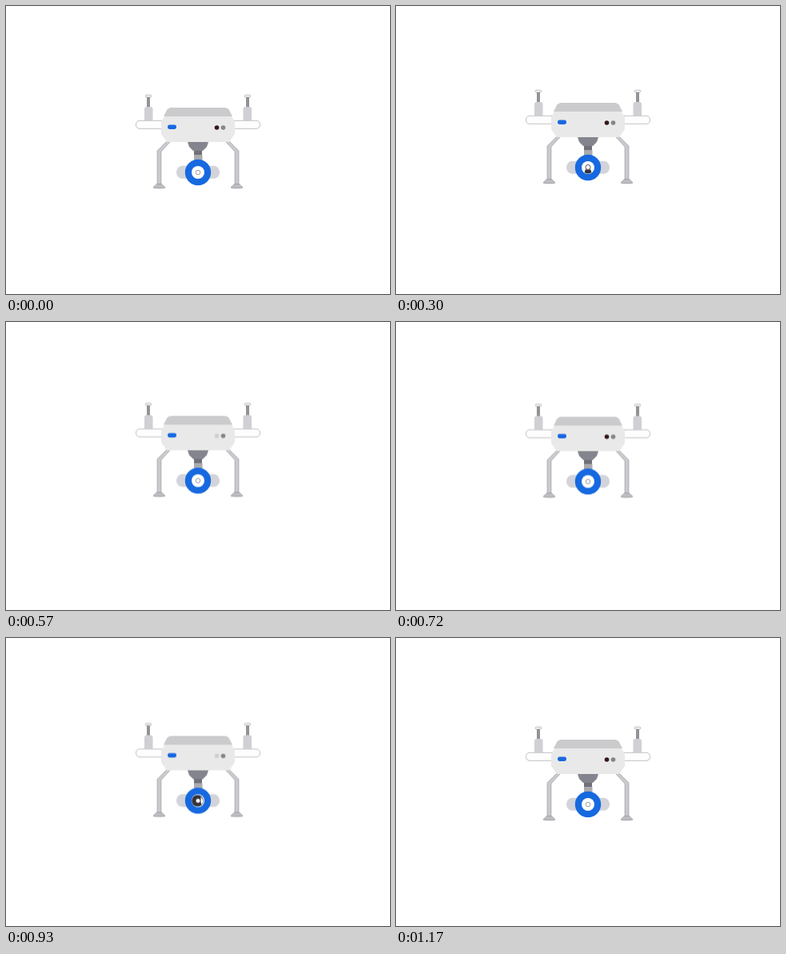
An HTML page without scripts that plays this animation: 480 by 360 pixels, repeating every 1.2 s.

```html
<!DOCTYPE html>
<html lang="en">
<head>
<meta charset="utf-8">
<title>Hovering drone</title>
<style>
  html, body { margin: 0; width: 100%; height: 100%; overflow: hidden; background: #fff; }
  svg { display: block; width: 480px; height: 360px; }
  .drone { animation: hover 1.2s linear infinite; }
  .led { animation: blink .4s step-end infinite; }
  .glint { animation: glint 1.2s step-end infinite; }
  .iris { animation: iris 1.2s step-end infinite; }
  .edge { stroke: #85858f; stroke-width: .5; }

  @keyframes hover {
    0%, 97.5%, 100% { transform: translateY(0); }
    15% { transform: translateY(-3.8px); }
    25% { transform: translateY(-6px); }
    37.5% { transform: translateY(-8.8px); }
    48% { transform: translateY(-9.7px); }
    60% { transform: translateY(-8.6px); }
    77.5% { transform: translateY(-4.6px); }
    90% { transform: translateY(-1.3px); }
  }
  @keyframes blink {
    0%, 60% { fill: #351719; }
    7.5% { fill: #cfcfd1; }
  }
  @keyframes glint {
    0%, 32.5%, 87.5% { opacity: 0; }
    10% { opacity: 1; }
    70% { opacity: 0; }
  }
  @keyframes iris {
    0%, 87.5% { opacity: 0; }
    70% { opacity: 1; }
  }
</style>
</head>
<body>
<svg viewBox="0 0 480 360">
  <defs>
    <g id="side">
      <rect class="edge" x="162.5" y="143.3" width="40" height="10" rx="4.5" fill="#fdfdfe"/>
      <path d="M176 114h4v13h-4z" fill="#929297"/>
      <rect class="edge" x="174.3" y="111.2" width="7.4" height="2.8" rx="1.2" fill="#f4f4f6"/>
      <path d="M173 143v-14q0-3 3-3h4.500q3 0 3 3v14z" fill="#d0d0d4"/>
      <path class="edge" d="M201 169h5l-12 13v41h-5v-42z" fill="#cacace"/>
      <path class="edge" d="M184.500 227.500v-1.500l4-3.500h6l4 3.500v1.500q-7 1-14 0z" fill="#bdbdc1"/>
    </g>
  </defs>
  <g class="drone">
    <use href="#side"/>
    <use href="#side" transform="translate(480) scale(-1 1)"/>

    <path d="M227 170h26l-2 6-5 5h-12l-5-5z" fill="#84848e"/>
    <path d="M235 181h10v5h-10z" fill="#707078"/>
    <path d="M235 186h10.500v8h-10.500z" fill="#aaaaae"/>

    <path d="M207 127h66q4 0 6 3l4 8h-86l4-8q2-3 6-3z" fill="#cbcbce"/>
    <path d="M198 138h84l4 7v15l-7 10h-78l-7-10v-15z" fill="#e9e9e9"/>
    <rect x="202" y="148.600" width="11" height="5.400" rx="2.400" fill="#1769e0"/>
    <circle class="led" cx="263.500" cy="152" r="2.800"/>
    <circle cx="271.500" cy="152" r="2.800" fill="#85858a"/>

    <rect x="213" y="199.800" width="54" height="16" rx="7.500" fill="#d3d4da"/>
    <circle cx="240" cy="208" r="16.200" fill="#1769e0"/>
    <circle cx="240" cy="208" r="8" fill="#fff"/>
    <circle cx="240" cy="208" r="2.800" fill="#fff" stroke="#85858c" stroke-width=".8"/>
    <g class="glint">
      <path d="M235.500 214l1.500-4q3 2 6 0l1.500 4q-4.500 3-9 0z" fill="#33343a"/>
      <circle cx="240" cy="207.500" r="3" fill="#fff" stroke="#55565c"/>
    </g>
    <g class="iris">
      <circle cx="239.500" cy="208" r="7.300" fill="#33343a"/>
      <path d="M243.500 203q5 4 1 10l-1-3z" fill="#fff"/>
      <circle cx="240" cy="208" r="2.500" fill="#fff"/>
    </g>
  </g>
</svg>
</body>
</html>
```
